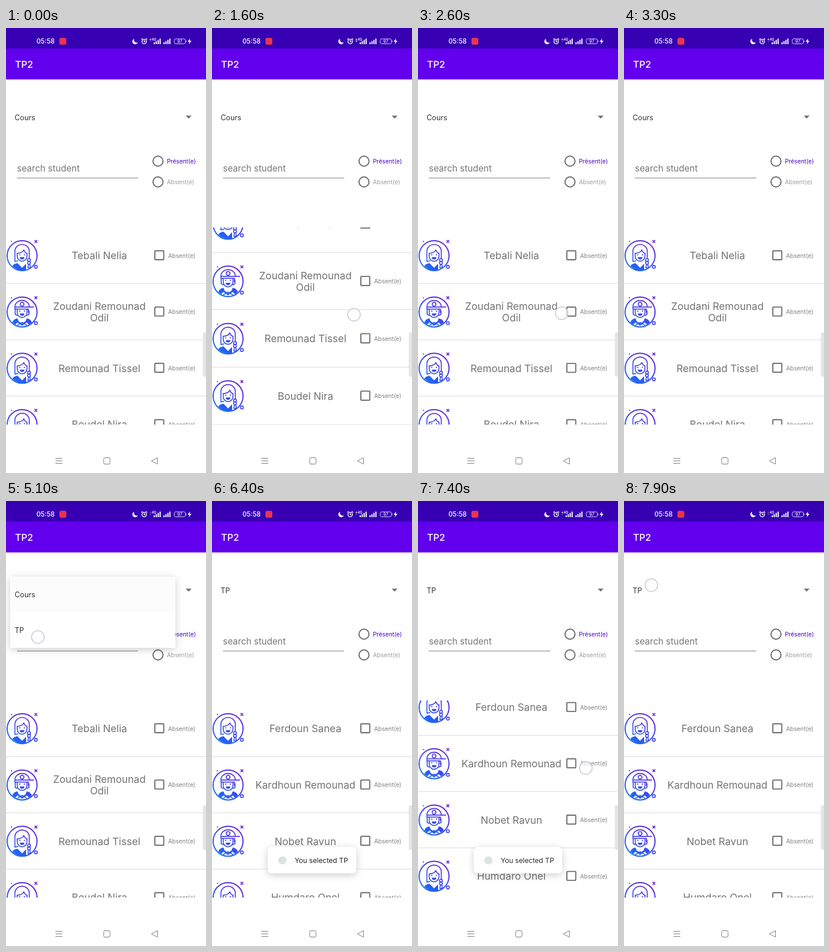
An HTML page that plays this animation: 348 px wide and 772 px high, repeating every 8 s.

```html
<!DOCTYPE html>
<html lang="fr">
<head>
<meta charset="utf-8">
<title>TP2</title>
<style>
  html, body { margin: 0; height: 100%; overflow: hidden; background: #fff; }
  svg { display: block; width: 100vw; height: 100vh; }
  text { font-family: Inter, Roboto, sans-serif; }
  .name { font-size: 17.6px; fill: #737373; text-anchor: middle; }
  .label { font-size: 10.3px; }
  .item { font-size: 12.7px; fill: #303030; }
  .box { fill: none; stroke: #696969; stroke-width: 1.9; }
  .line { fill: none; stroke: url(#ink); stroke-width: 1.7; stroke-linecap: round; stroke-linejoin: round; }
  .solid { fill: url(#ink); }
</style>
</head>
<body>
<svg viewBox="0 0 348 772">
  <defs>
    <linearGradient id="ink" gradientUnits="userSpaceOnUse" x1="-18" y1="24" x2="18" y2="-24">
      <stop stop-color="#176ffa"/><stop offset="1" stop-color="#651ddc"/>
    </linearGradient>
    <clipPath id="window"><path d="M0 346H348V688H0z"/></clipPath>
    <filter id="shadow" x="-20%" y="-60%" width="140%" height="240%">
      <feDropShadow dx="0" dy="3" stdDeviation="7" flood-opacity=".2"/>
    </filter>
    <g id="frame">
      <circle r="26" class="line" style="stroke-width:2"/>
      <circle cx="24" cy="19.3" r="2.5" class="line" style="fill:#fff"/>
      <path d="M22.2-26.5l3.6 3.6m0-3.6l-3.6 3.6" class="line"/>
      <circle cx="-18.5" cy="-24.7" r="1.1" class="solid"/>
    </g>
    <g id="face">
      <path d="M-8.5-4V1a8.5 8.5 0 0 0 17 0V-4" class="line"/>
      <circle cx="-4" cy="-1.5" r="1.1" class="solid"/>
      <circle cx="4" cy="-1.5" r="1.1" class="solid"/>
      <path d="M-4 2.500h8a4 4 0 0 1-8 0z" class="solid"/>
    </g>
    <g id="girl">
      <use href="#frame"/><use href="#face"/>
      <path d="M-12.500 10V-8a12.500 11.500 0 0 1 25 0V5M-8.500-4Q1-5 3-10Q5-5 8.500-4M-12.500 10l5-1" class="line"/>
      <path d="M-17 18q2-4 9-5l8 8 7-7V24.500Q-7 28-17 18z" class="solid"/>
      <g class="line"><circle cx="12" cy="7.500" r="2.500"/><circle cx="12" cy="12.500" r="2.500"/><path d="M11 15.500l-1 5.500h4.500l-1-5.500"/></g>
    </g>
    <g id="boy">
      <use href="#frame"/><use href="#face"/>
      <path d="M-12.500-5v-4a12.500 11 0 0 1 25 0M-12.500-8.500H20M-12.500-5H11V1M-12-4V4l3.500 2M12-2v6l-3.500 2" class="line"/>
      <circle cy="-13.500" r="3.300" class="line"/>
      <path d="M-17 18q2-6 9-7l2 5 6 4 6-4 2-5q7 1 9 7l-5 4-4-4-8 6-8-6-4 4z" class="solid"/>
      <path d="M-8 23L0 18l8 5" class="line"/>
    </g>
  </defs>

  <path d="M0 0H348V772H0z" fill="#fff"/>
  <path d="M0 0H348V36H0z" fill="#3700b3"/>
  <path d="M0 35.500H348V89.300H0z" fill="#6200ee"/>

  <g fill="#fff">
    <text x="53" y="27.300" font-size="11.400" font-weight="500">05:58</text>
    <rect x="93" y="17" width="12" height="12" rx="3" fill="#e9344f"/>
    <path d="M223 18.500a5 5 0 1 0 6.500 6.500a5 5 0 0 1-6.500-6.500z"/>
    <g fill="none" stroke="#fff" stroke-width="1.400">
      <circle cx="240.500" cy="23.500" r="3.900"/>
      <path d="M235.500 20l2.300-2m5.400 0l2.300 2M240.500 21v2.800h2"/>
    </g>
    <text x="253.500" y="21.800" font-size="5.500" font-weight="600">4G</text>
    <path id="up" d="M249.500 20.500l1.800-2.300 1.800 2.300z"/>
    <path id="down" d="M249.500 22l1.800 2.300 1.800-2.300z"/>
    <g id="bars"></g>
    <rect x="292.800" y="18.800" width="19.400" height="8.600" rx="2.500" fill="none" stroke="#d8ccff"/>
    <path d="M313.200 21.500v3.200" stroke="#d8ccff"/>
    <text x="302.500" y="26" font-size="7.600" text-anchor="middle">97</text>
    <path d="M320.500 18l-4.500 5.800h3l-1.200 4.400 5-6h-3.200z"/>
    <text x="15.700" y="69" font-size="16.400" font-weight="500">TP2</text>
  </g>

  <text id="course" class="item" x="15" y="159.500"></text>
  <path d="M312.800 152h10l-5 5.200z" fill="#737373"/>
  <text x="19" y="249.300" font-size="15.500" fill="#767676">search student</text>
  <path d="M19 260.200H230" stroke="#777"/>
  <circle class="box" cx="264.500" cy="231" r="8.700"/>
  <circle class="box" cx="264.500" cy="267" r="8.700"/>
  <text class="label" x="280" y="234.800" fill="#4600c4">Présent(e)</text>
  <text class="label" x="280" y="270.800" fill="#9c9c9c">Absent(e)</text>

  <g clip-path="url(#window)"><g id="list"></g></g>
  <rect x="342.500" y="528" width="9" height="77" rx="3" fill="#e4e4e4"/>

  <g id="popup">
    <rect x="7.500" y="131" width="287" height="123.500" rx="1.500" fill="#fff" filter="url(#shadow)"/>
    <path d="M8 131H294V193H8z" fill="#fcfcfc"/>
    <text class="item" x="15" y="167.300">Cours</text>
    <text class="item" x="15" y="229.300">TP</text>
  </g>

  <g id="toast">
    <rect x="97" y="600" width="154" height="46" rx="8" fill="#fff" filter="url(#shadow)"/>
    <circle cx="122.500" cy="623.500" r="7" fill="#d8e4dc"/>
    <text x="144" y="627.700" font-size="12.100" fill="#222">You selected TP</text>
  </g>

  <circle id="touch" r="11" fill="#fff" fill-opacity=".7" stroke="#cbc8dc" stroke-width="1.500"/>

  <g fill="none" stroke="#7d7d7d">
    <path d="M86 746.500h12m-12 4.500h12m-12 4.500h12"/>
    <rect x="170" y="745.500" width="11" height="11" rx="2"/>
    <path d="M263.500 745.500v11l-10.500-5.500z" stroke-linejoin="round"/>
  </g>
</svg>
<script>
const LOOP = 8000, ROW = 97.65, TOP = 346, BOTTOM = 687.5, RANGE = 48.5;
const $ = id => document.getElementById(id);

const lists = {
  Cours: [['girl', 'Tebali Nelia'], ['boy', 'Zoudani Remounad', 'Odil'],
          ['girl', 'Remounad Tissel'], ['girl', 'Boudel Nira']],
  TP: [['girl', 'Ferdoun Sanea'], ['boy', 'Kardhoun Remounad'],
       ['boy', 'Nobet Ravun'], ['girl', 'Humdaro Onel']]
};

const rowMarkup = ([avatar, ...lines], i) => `
  <g transform="translate(0 ${395 + ROW * i})">
    <use href="#${avatar}" x="28"/>
    ${lines.map((line, k) => `<text class="name" x="162.5"
      y="${6.3 + (k - (lines.length - 1) / 2) * 20.5}">${line}</text>`).join('')}
    <rect class="box" x="259" y="-8.5" width="15.5" height="15.5" rx="1"/>
    <text class="label" x="282" y="3.6" fill="#808080">Absent(e)</text>
    <path d="M0 48.3H348" stroke="#d9d9d9"/>
  </g>`;

$('bars').innerHTML = [257, 274].map(x => [0, 1, 2, 3].map(i =>
  `<rect x="${x + i * 3.4}" y="${25 - i * 2.2}" width="2" height="${3 + i * 2.2}"/>`).join('')).join('');

// Eased interpolation through [time, value] stops.
function track(t, ...stops) {
  if (t <= stops[0][0]) return stops[0][1];
  for (let i = 1; i < stops.length; i++) {
    const [t0, a] = stops[i - 1], [t1, b] = stops[i];
    if (t < t1) {
      const p = (t - t0) / (t1 - t0);
      return a + (b - a) * p * p * (3 - 2 * p);
    }
  }
  return stops[stops.length - 1][1];
}

// Finger contacts: start, end, x, y at start, y at end.
const touches = [
  [1370, 1720, 247, 580, 455], [2380, 2760, 250, 425, 545],
  [3370, 3560, 318, 154, 154], [5060, 5220, 55.5, 236, 236],
  [6570, 6850, 299, 560, 449], [7320, 7600, 292, 430, 545],
  [7840, 8100, 47.5, 146, 146]
];

function drawTouch(t) {
  const hit = touches.find(([a, b]) => t >= a && t < b + 80);
  $('touch').setAttribute('opacity', hit ? track(t, [hit[1], 1], [hit[1] + 80, 0]) : 0);
  if (!hit) return;
  const [start, end, x, y0, y1] = hit;
  $('touch').setAttribute('cx', x);
  $('touch').setAttribute('cy', y0 + (y1 - y0) * Math.min(1, (t - start) / (end - start)));
}

function drawList(t) {
  const scroll = RANGE * track(t, [1380, 0], [1540, 1], [2400, 1], [2600, 0],
    [6580, 0], [6750, 1], [7350, 1], [7510, 0]);
  const stretch = track(t, [1520, 0], [1600, .019], [1700, .02], [2080, 0],
    [2590, 0], [2750, .02], [3180, 0], [6740, 0], [6820, .014], [7020, 0],
    [7500, 0], [7590, .015], [7860, 0]);
  const anchor = scroll > RANGE / 2 ? BOTTOM : TOP;
  $('list').setAttribute('transform',
    `translate(0 ${-anchor * stretch}) scale(1 ${1 + stretch}) translate(0 ${-scroll})`);
}

let shown;
function showCourse(course) {
  if (course === shown) return;
  shown = course;
  $('course').textContent = course;
  $('list').innerHTML = lists[course].map(rowMarkup).join('');
}

function draw(now) {
  const t = now % LOOP;
  showCourse(t < 5280 ? 'Cours' : 'TP');
  drawList(t);
  drawTouch(t);
  $('popup').setAttribute('opacity', track(t, [3520, 0], [3680, 1], [5220, 1], [5360, 0]));
  $('toast').setAttribute('opacity', track(t, [5360, 0], [5560, 1], [7380, 1], [7540, 0]));
  $('up').setAttribute('opacity', t < 3400 || t > 6400 && t < 7500 ? 1 : .3);
  $('down').setAttribute('opacity', t > 1400 && t < 2400 ? 1 : .3);
  requestAnimationFrame(() => draw(performance.now()));
}
draw(0);
</script>
</body>
</html>
```
